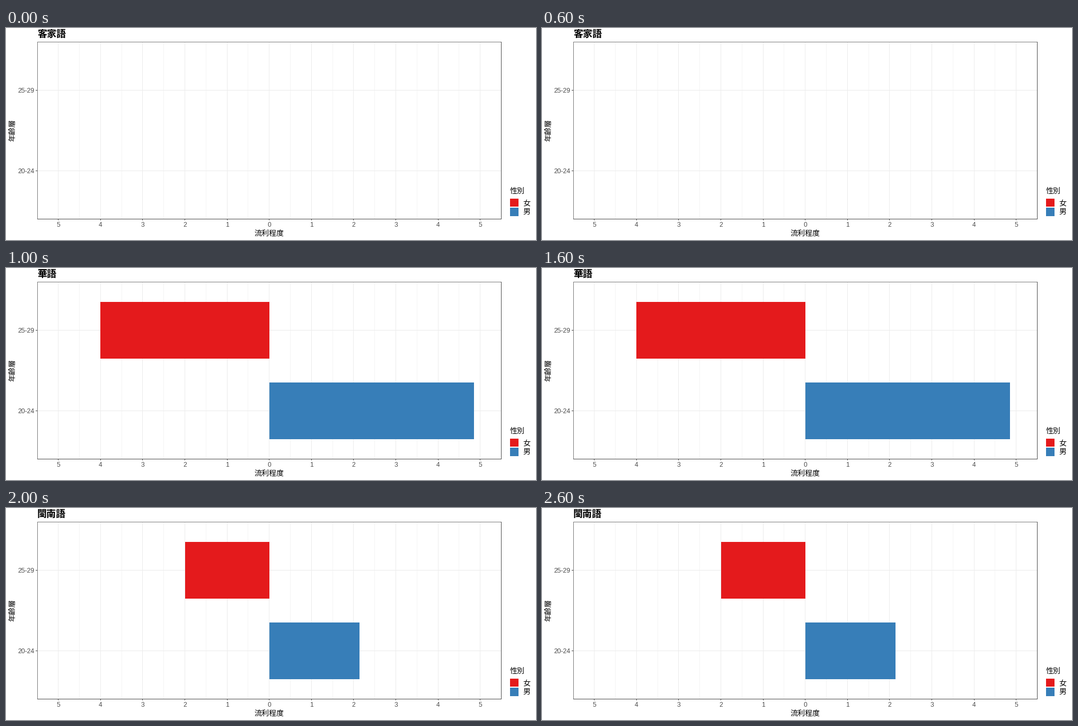
Recreate the animation shown at these times as a matplotlib script. Size 1000 by 400 pixels, loop 3 s.

```python
import matplotlib.pyplot as plt
from matplotlib.animation import FuncAnimation
from matplotlib.patches import Rectangle

W, H, DPI = 1000, 400, 100
PX = 72 / DPI
LEFT, TOP, RIGHT, BOTTOM = 59, 26, 934, 360
ZERO, UNIT = 496.75, 79.59
RED, BLUE = "#E41A1C", "#377EB8"
CJK, LATIN = "Noto Sans CJK JP", "Liberation Sans"

# title, female 25-29, male 20-24
SCENES = [("客家語", 0, 0), ("華語", 4, 34 / 7), ("閩南語", 2, 15 / 7)]

fig = plt.figure(figsize=(W / DPI, H / DPI), dpi=DPI, facecolor="white")
ax = fig.add_axes([0, 0, 1, 1])
ax.set_xlim(0, W)
ax.set_ylim(H, 0)
ax.axis("off")


def line(x0, y0, x1, y1, color, z):
    ax.plot([x0, x1], [y0, y1], color=color, lw=PX, zorder=z,
            solid_capstyle="butt", snap=False)


def box(x, y, w, h, color):
    return ax.add_patch(Rectangle((x, y), w, h, fc=color, lw=0, zorder=2))


def label(x, y, text, size, font=CJK, color="black", **kw):
    return ax.text(x, y, text, fontsize=size * PX, family=font, color=color,
                   va="baseline", **kw)


def pixel(value):
    return int(ZERO + value * UNIT) + 0.5


for k in range(-5, 5):
    x = pixel(k + 0.5)
    line(x, TOP, x, BOTTOM, "#F4F4F4", 0)
for k in range(-5, 6):
    x = pixel(k)
    line(x, TOP, x, BOTTOM, "#EBEBEB", 1)
    line(x, BOTTOM + 1, x, BOTTOM + 3, "#444444", 3)
    label(ZERO + k * UNIT, 375, str(abs(k)), 12, LATIN, "#4D4D4D", ha="center")
for y, group in ((117.5, "25-29"), (269.5, "20-24")):
    line(LEFT, y, RIGHT, y, "#EBEBEB", 1)
    line(LEFT - 3, y, LEFT, y, "#444444", 3)
    label(54, y + 4.5, group, 12.3, LATIN, "#4D4D4D", ha="right")

female = box(ZERO, 64, 0, 107, RED)
male = box(ZERO, 216, 0, 107, BLUE)

# panel border
line(LEFT, TOP + 0.5, RIGHT + 1, TOP + 0.5, "#7A7A7A", 3)
line(LEFT + 0.5, TOP, LEFT + 0.5, BOTTOM + 1, "#7A7A7A", 3)
line(LEFT, BOTTOM + 0.5, RIGHT + 1, BOTTOM + 0.5, "#4A4A4A", 3)
line(RIGHT + 0.5, TOP, RIGHT + 0.5, BOTTOM + 1, "#4A4A4A", 3)

title = label(59, 17, "", 18, weight="bold")
label(ZERO, 392, "流利程度", 14, ha="center")
label(16, 192.5, "年齡層", 14, ha="center", rotation=90, rotation_mode="anchor")

# legend
label(951, 312, "性別", 14)
for y, h, color, sex in ((322, 15, RED, "女"), (339, 16, BLUE, "男")):
    box(951, y, 16, h, color)
    label(975, y + 12, sex, 14)


def update(i):
    name, f, m = SCENES[i]
    title.set_text(name)
    female.set_x(ZERO - f * UNIT)
    female.set_width(f * UNIT)
    male.set_width(m * UNIT)
    female.set_visible(f > 0)
    male.set_visible(m > 0)
    return title, female, male


anim = FuncAnimation(fig, update, frames=len(SCENES), interval=1000,
                     repeat=True, repeat_delay=0)
plt.show()
```
